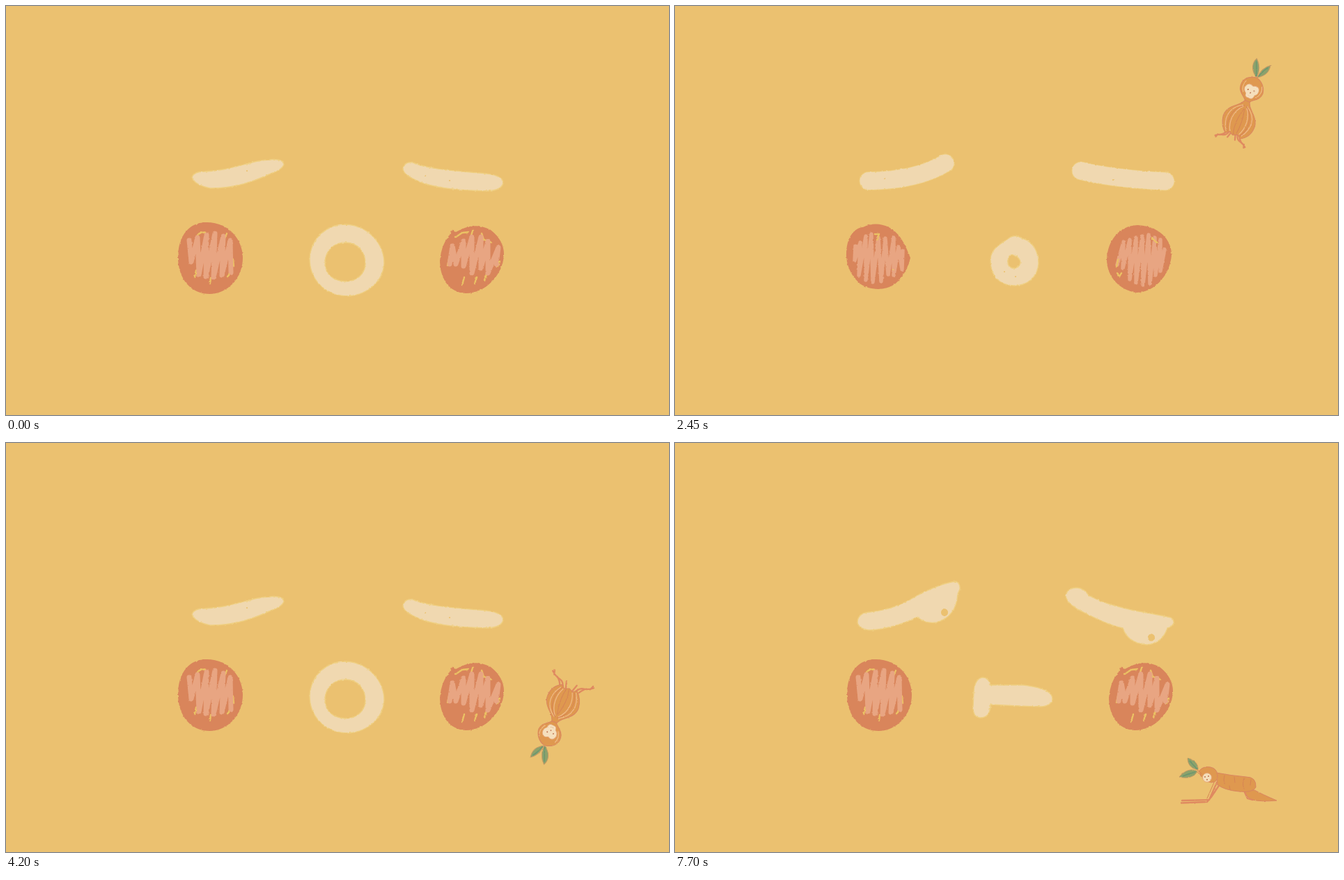
An HTML page for the animation above (8 s loop, 952 by 588 pixels).

```html
<!DOCTYPE html>
<html lang="en">
<head>
<meta charset="utf-8">
<title>Worried face</title>
<style>
  html, body { margin: 0; width: 100%; height: 100%; overflow: hidden; background: #ebc170; }
  svg { display: block; width: 100%; height: 100%; }
  .part { display: none; }
  .part.on { display: inline; }
  .cream { fill: #f0d8b0; stroke: #efcf82; stroke-width: 1.4; fill-rule: evenodd; }
  .brow { fill: none; stroke: #f0d8b0; stroke-width: 25; stroke-linecap: round; }
  .halo { fill: none; stroke: #efcf82; stroke-width: 27; stroke-linecap: round; }
  .cheek { fill: #d9855b; }
  .hatch { fill: none; stroke: #e8a582; stroke-width: 7; stroke-linecap: round; stroke-linejoin: round; }
  .thin { stroke-width: 5.4; }
  .gap { fill: none; stroke: #ebc264; stroke-width: 2.4; stroke-linecap: round; }
  .hole { fill: #ebc170; }
  .leaf { fill: #8ca26b; stroke: #c99a66; stroke-width: .9; }
  .vein { fill: none; stroke: #6a9670; stroke-width: 1.4; }
  .skin { fill: #df984f; stroke: #d98561; stroke-width: 1; }
  .stripe { fill: none; stroke: #efb885; stroke-width: 1.3; }
  .line { fill: none; stroke: #d68455; stroke-width: 1; stroke-linecap: round; }
  .limb { fill: none; stroke: #df8a60; stroke-width: 2.3; stroke-linecap: round; stroke-linejoin: round; }
  .pale { fill: #f5dfbc; stroke: #e6a878; stroke-width: .9; }
  .dot { fill: #bd7350; }
</style>
</head>
<body>
<svg viewBox="0 0 952 588" preserveAspectRatio="none">
  <defs>
    <filter id="chalk" filterUnits="userSpaceOnUse" x="0" y="0" width="952" height="588" color-interpolation-filters="sRGB">
      <feTurbulence type="fractalNoise" baseFrequency=".3" numOctaves="2" seed="4"/>
      <feDisplacementMap in="SourceGraphic" scale="2.6" xChannelSelector="R" yChannelSelector="G"/>
    </filter>
    <filter id="pencil" filterUnits="userSpaceOnUse" x="0" y="0" width="952" height="588" color-interpolation-filters="sRGB">
      <feTurbulence type="fractalNoise" baseFrequency=".4" numOctaves="2" seed="9"/>
      <feDisplacementMap in="SourceGraphic" scale="2" xChannelSelector="R" yChannelSelector="G"/>
    </filter>
  </defs>

  <g filter="url(#chalk)">
    <g class="part" id="cheeksA">
      <path class="cheek" d="M247,361C247,334 260,311 288,311C322,311 340,338 340,362C340,391 318,414 292,414C265,414 247,392 247,361Z"/>
      <path class="gap" d="M274,331Q278,324 287,326M271,390L273,380M293,399L294,391M318,389Q322,386 323,377M327,374L326,364M314,334L317,327"/>
      <path class="hatch" d="M263,337L266,368L275,333L277,386L288,329L287,389L300,327L298,390L312,331L310,387L322,337L323,383"/>
      <path class="cheek" d="M641,321L646,325Q672,309 696,322Q715,337 715,357C714,385 690,413 660,413C635,412 623,390 623,366Q625,343 636,331Z"/>
      <path class="gap" d="M646,332L655,326L664,325M668,330L670,323M683,327L686,336L697,340M655,401L658,390M673,399L676,390M687,394L690,386M706,374L709,367M634,373L636,364"/>
      <path class="hatch" d="M637,371L641,345L646,371L657,338L657,374L669,332L669,384L682,332L682,377L692,338L692,384L707,347L704,371"/>
    </g>
    <g class="part" id="cheeksB">
      <path class="cheek" d="M246,360C245,332 258,319 270,318Q288,309 307,318C325,328 331,345 338,362Q335,377 327,387Q316,406 292,407C270,406 262,398 253,384Q247,373 246,360Z"/>
      <path class="hatch thin" d="M259,345L258,366L266,340L264,387L274,331L274,394L282,328L284,397L292,333L296,396L302,334L306,386L314,333L314,387L321,346L326,379L327,352"/>
      <path class="gap" d="M287,328L293,328L290,336"/>
      <path class="cheek" d="M620,364C621,337 638,316 664,315C694,316 713,335 713,358C711,385 691,411 663,412C638,409 620,389 620,364Z"/>
      <path class="hatch thin" d="M635,372L644,339L643,377L653,336L653,393L662,333L662,398L671,331L672,401L680,329L682,399L689,333L690,387L697,336L697,381L703,350"/>
      <path class="gap" d="M635,384L638,389L641,384M634,375L636,365M685,334L692,340"/>
    </g>

    <g class="part" id="eyesA">
      <path class="cream" d="M267,246Q270,238 284,238C320,237 345,225 368,222Q398,217 399,228Q396,236 380,241C350,255 325,262 293,262Q270,257 267,246Z"/>
      <path class="cream" d="M570,234Q572,223 584,225C610,236 650,237 690,241Q713,244 714,254Q712,265 692,266C655,265 625,263 600,255Q570,244 570,234Z"/>
    </g>
    <g class="part" id="eyesB">
      <path class="halo" d="M278,251.5C325,251 360,243 388,226M583,237C620,246 660,250 704,252"/>
      <path class="brow" d="M278,251.5C325,251 360,243 388,226M583,237C620,246 660,250 704,252"/>
    </g>
    <g class="part" id="eyesSad">
      <path class="cream" d="M262,257Q263,244 280,243C310,240 330,230 350,218C370,208 390,200 404,199Q410,203 409,210L406,217Q404,250 375,258Q358,260 348,250C325,262 295,269 278,269Q262,266 262,257Z"/>
      <path class="cream" d="M561,219Q564,208 577,208Q588,209 594,219C615,231 640,236 660,241Q690,246 712,251Q717,254 716,259Q713,265 707,266Q700,288 678,290Q650,288 643,266C622,262 600,250 580,240Q562,230 561,219Z"/>
      <ellipse class="hole pupil" cx="387" cy="243.5" rx="5" ry="5.5"/>
      <ellipse class="hole pupil" cx="684" cy="279.5" rx="5" ry="5"/>
    </g>

    <path class="part cream" id="mouthWide" d="M436,363C438,332 462,314 487,314C520,315 543,342 543,370C541,398 516,417 488,417C456,415 436,392 436,363ZM458,368C459,350 472,340 488,340C506,341 516,353 516,371C515,387 502,396 487,396C469,395 458,385 458,368Z"/>
    <path class="part cream" id="mouthSmall" d="M453,366C453,348 468,342 479,334Q489,327 498,334C514,338 522,353 522,370C521,390 506,402 487,402C465,401 453,388 453,366ZM478,366Q479,356 486,358Q496,362 496,369Q494,377 486,377Q477,376 478,366Z"/>
    <path class="part cream" id="mouthBean" d="M411,400C412,360 450,321 495,321C530,322 551,350 551,372C550,392 530,398 510,397Q497,398 490,410C482,425 470,436 445,436Q412,432 411,400ZM438,400C440,375 465,347 495,347Q528,349 529,362Q527,371 510,373C480,374 475,390 466,402Q458,411 445,411Q438,408 438,400Z"/>
    <path class="part cream" id="mouthFlat" d="M429,357Q431,338 442,337Q451,338 453,348L500,348Q542,353 542,368Q541,378 525,379Q490,378 453,376Q453,395 438,395Q428,394 428,380Z"/>
    <g id="specks" class="hole"></g>
  </g>

  <g filter="url(#pencil)">
    <g class="part" id="onion">
      <path class="limb" id="legs"/>
      <path class="skin" d="M-2,-6C-3,6 -24,10 -23,28Q-21,42 -11,50L-6,46L0,49L7,46L12,50Q25,43 25,28C25,11 5,6 5,-6Z"/>
      <path class="stripe" d="M-2,3C-21,14 -21,32 -11,47M-1,5C-13,17 -12,34 -6,45M4,5C14,17 14,34 8,45M4,3C23,14 22,32 12,46"/>
      <path class="line" d="M0,3C-17,15 -16,34 -9,46M1,8Q-5,30 0,47M2,8Q7,30 4,46M3,3C18,15 18,34 10,47"/>
      <path class="skin" d="M-1,-40C-12,-37 -17,-30 -16,-21C-15,-12 -6,-9 -2,-4L5,-4C8,-9 18,-12 18,-22C17,-31 10,-38 3,-40Z"/>
      <path class="stripe" d="M-11,-31Q-15,-22 -9,-14M13,-31Q18,-22 11,-13"/>
      <path class="pale" d="M1,-27Q8,-31 11,-25Q13,-19 8,-15Q8,-8 1,-9Q-5,-8 -5,-14Q-11,-18 -9,-24Q-6,-31 1,-27Z"/>
      <g class="dot"><circle cx="-4" cy="-20" r="1"/><circle cx="5" cy="-21" r="1"/><circle cx="1" cy="-17" r=".9"/><path d="M-2,-13Q1,-11 4,-13L1,-12Z"/></g>
      <path class="leaf" d="M0,-41C-11,-48 -13,-58 -9,-66C-2,-60 2,-51 1,-41ZM2,-41C2,-51 6,-59 13,-64C15,-55 12,-47 2,-41Z"/>
      <path class="vein" d="M0,-42Q-4,-53 -8,-62M3,-43Q6,-53 11,-60"/>
    </g>

    <g class="part" id="carrot">
      <path class="leaf" d="M751,470C740,468 736,461 736,453C745,455 752,461 751,470ZM750,472C742,467 731,471 724,480C734,483 746,481 750,472Z"/>
      <path class="vein" d="M750,469Q744,463 739,457M748,473Q738,475 729,479"/>
      <path class="skin" d="M832,499Q843,505 864,514Q842,516 829,513Q820,509 816,499Z"/>
      <path class="limb" d="M818,502L822,511L829,513"/>
      <path class="limb" d="M778,488L767,513L728,514M782,491L770,509L764,516L727,517.5"/>
      <path class="line" d="M774,488L764,511"/>
      <path class="skin" d="M777,474Q798,478 820,480Q835,480 834,495Q830,503 810,501Q788,499 779,491Z"/>
      <path class="line" d="M789,478Q787,484 789,490M803,480L804,488M817,482Q814,490 817,497M827,484L826,492M796,493L797,498"/>
      <path class="skin" d="M752,472Q758,464 769,466Q778,468 779,477Q780,488 770,488Q757,487 752,472Z"/>
      <path class="line" d="M750,470L757,476M750,473L756,478"/>
      <circle class="pale" cx="764" cy="481" r="6.4"/>
      <g class="dot" id="look"><circle cx="761" cy="480" r="1"/><circle cx="766" cy="479" r="1"/><circle cx="764" cy="484" r="1"/></g>
    </g>
  </g>
</svg>
<script>
const STEP = 350, LOOP = 8000;
const $ = id => document.getElementById(id);
const parts = [...document.querySelectorAll('.part')];
const pupils = [...document.querySelectorAll('.pupil')];

// onion path: x, y, angle, leg spread; one row per step, from step 4
const fall = [
  [819, -15, 22, .72], [819, 35, 22, .72], [819, 87, 22, .72], [819, 140, 22, .72],
  [822, 190, 55, .9], [823, 235, 90, 1], [800, 289, 128, 1], [794, 343, 168, 1],
  [790, 398, 203, 1], [790, 450, 206, 1], [793, 450, 207, 1]
];

// late scenes: start, visible parts, eye lift, carrot shift, pupil height, gaze
const scenes = [
  [5250, 'cheeksB eyesSad mouthBean carrot', -4, 22, 1, 0],
  [5950, 'cheeksA eyesSad mouthBean carrot', 0, 0, 1, 0],
  [6650, 'cheeksA eyesSad mouthFlat carrot', 0, 0, 1, 1],
  [7000, 'cheeksA eyesSad mouthFlat carrot', 0, 0, .5, -1],
  [7700, 'cheeksA eyesSad mouthFlat carrot', 0, 0, 1, 0]
];

const specks = {
  A: [[346, 237], [602, 244], [637, 251]],
  B: [[301, 248], [629, 250], [473, 382], [489, 389], [313, 379]]
};

function legs(s) {
  const y = n => (48 + (n - 48) * s).toFixed(1);
  return [-1, 1].map(d => {
    const p = (a, b) => `${(d * a * s).toFixed(1)},${y(b)}`;
    return `M${p(9, 46)}Q${p(12, 55)} ${p(18, 56)}Q${p(25, 57)} ${p(32, 63)}` +
      `M${p(14, 46)}Q${p(16, 53)} ${p(23, 58)}M${p(28, 59)}L${p(30, 65)}M${p(5, 47)}L${p(8, 57)}`;
  }).join('');
}

function show(names) {
  const on = names.split(' ');
  parts.forEach(p => p.classList.toggle('on', on.includes(p.id)));
}

function dots(list) {
  $('specks').innerHTML = list.map(([x, y]) => `<circle cx="${x}" cy="${y}" r="1.1"/>`).join('');
}

function early(n) {
  const side = n % 2 ? 'B' : 'A';
  const pose = fall[n - 4];
  show(`cheeks${side} eyes${side} mouth${n % 2 ? 'Small' : 'Wide'}${pose ? ' onion' : ''}`);
  dots(specks[side]);
  if (!pose) return;
  const [x, y, a, spread] = pose;
  $('onion').setAttribute('transform', `translate(${x} ${y}) rotate(${a})`);
  $('legs').setAttribute('d', legs(spread));
}

function late([, names, lift, shift, open, gaze]) {
  show(names);
  dots([]);
  $('eyesSad').setAttribute('transform', `translate(0 ${lift})`);
  $('carrot').setAttribute('transform', `translate(${shift} 0)`);
  $('look').setAttribute('transform', `translate(${gaze} 0)`);
  pupils.forEach(p => p.setAttribute('ry', 5.3 * open));
}

let last, start;
function tick(now) {
  start ??= now;
  const t = (now - start) % LOOP;
  const scene = scenes.findLast(s => t >= s[0]);
  const key = scene ? scene[0] : Math.floor(t / STEP);
  if (key !== last) {
    scene ? late(scene) : early(key);
    last = key;
  }
  requestAnimationFrame(tick);
}
early(0);
requestAnimationFrame(tick);
</script>
</body>
</html>
```
